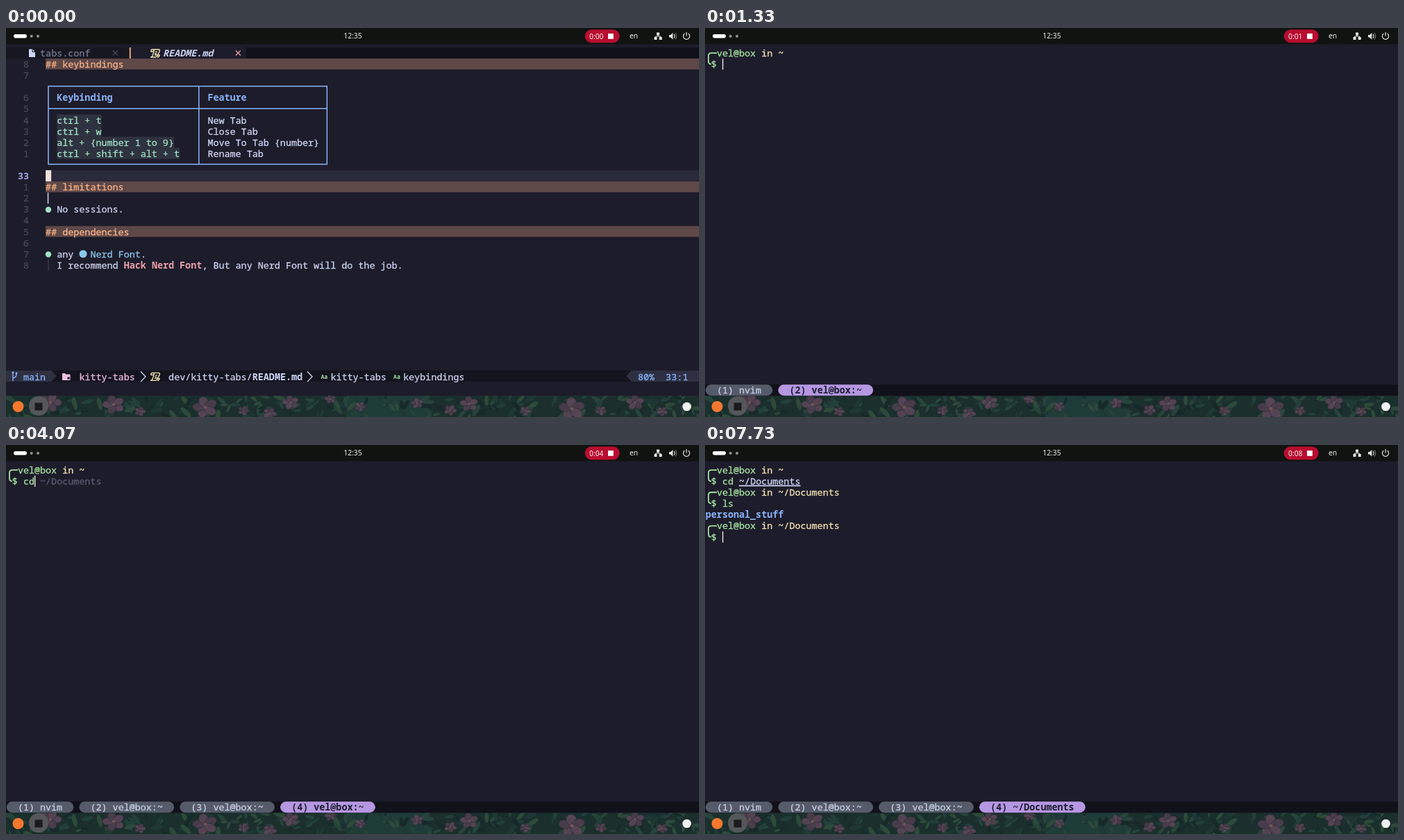
An HTML page that plays this animation: 998x561 px, repeating every 8000 ms.

```html
<!DOCTYPE html>
<html lang="en">
<head>
<meta charset="utf-8">
<title>Terminal tabs</title>
<style>
  html, body { margin: 0; width: 100%; height: 100%; overflow: hidden; background: #1d1c2a; }
  svg { display: block; width: 100vw; height: 100vh; }
  text { font: 13.4px "Noto Sans Mono", "DejaVu Sans Mono", monospace; white-space: pre; }
  .cell { stroke-width: .3px; }
  .bold { font-weight: 700; stroke-width: 0; }
  .slant { font-style: italic; }
  .line { text-decoration: underline; }
  .bar { font: 10.3px "Noto Sans", "Open Sans", sans-serif; fill: #eee; }
  .tiny { font-size: 8px; font-weight: 700; }
</style>
</head>
<body>
<svg id="stage" viewBox="0 0 998 561" xmlns="http://www.w3.org/2000/svg"></svg>
<script>
const LOOP = 8000;
const CW = 8.045, CH = 16.1, TOP = 28;
const C = {
  base: '#1d1c2a', dark: '#11111a', text: '#cdd6f4', green: '#a6e3a1', teal: '#a3e2c6',
  yellow: '#f3e3b3', blue: '#89b4fa', sky: '#89c8ea', pink: '#f0bfe2', rose: '#eba0ac',
  peach: '#fab387', dim: '#45475a', ghost: '#585b70', panel: '#2e3042', cursor: '#f0e1dc'
};
const USER = 'vel@box';

const cx = col => 0.8 + col * CW;
const cy = row => TOP + row * CH;

const rect = (x, y, w, h, fill, r = 0) =>
  `<rect x="${x}" y="${y}" width="${w}" height="${h}" rx="${r}" fill="${fill}"/>`;
const circle = (x, y, r, fill) => `<circle cx="${x}" cy="${y}" r="${r}" fill="${fill}"/>`;
const path = (d, stroke, w = 1.4, fill = 'none') =>
  `<path d="${d}" stroke="${stroke}" stroke-width="${w}" fill="${fill}"/>`;
const label = (x, y, s, attrs = '') => `<text x="${x}" y="${y}" ${attrs}>${s}</text>`;
const mono = (x, y, s, fill, cls) =>
  label(x, y, s, `fill="${fill}" stroke="${fill}" class="cell ${cls}"`);
const put = (col, row, s, fill = C.text, cls = '') => mono(cx(col), cy(row) + 12.9, s, fill, cls);
const during = (from, to, body) => `<g data-from="${from}" data-to="${to}">${body}</g>`;
const block = (col, row) => rect(cx(col), cy(row), CW, CH, C.cursor);
const beam = (col, row) => rect(cx(col), cy(row), 1.4, CH, C.cursor);

function randomFrom(seed) {
  return () => (seed = (seed * 16807) % 2147483647) / 2147483647;
}

function flower(x, y, r, turn) {
  let s = '';
  for (let i = 0; i < 5; i++) {
    const fill = i % 2 ? '#523f50' : '#5f475a';
    s += `<ellipse cx="${r * 0.52}" rx="${r * 0.5}" ry="${r * 0.38}" fill="${fill}" stroke="#33303b" stroke-width=".8" transform="rotate(${i * 72 + turn})"/>`;
  }
  return `<g transform="translate(${x} ${y}) scale(1 .85)" opacity=".85">${s}${circle(0, 0, r * 0.14, '#7b5c5c')}</g>`;
}

function wallpaper() {
  const rnd = randomFrom(77);
  const greens = ['#27443a', '#223f3a', '#2d4a3a', '#172a29', '#1f3835'];
  let s = rect(0, 530, 998, 31, '#1b2f2d') + rect(490, 530, 120, 31, '#1e3c38');
  for (let i = 0; i < 230; i++) {
    const x = rnd() * 998, y = 530 + rnd() * 31, a = rnd() * 180, l = 4 + rnd() * 6;
    s += `<ellipse cx="${x}" cy="${y}" rx="${l}" ry="${l * 0.36}" fill="${greens[i % 5]}" transform="rotate(${a} ${x} ${y})"/>`;
  }
  const spots = [[64, 540, 16], [155, 543, 16], [193, 553, 8], [287, 547, 18], [342, 552, 8], [410, 540, 12],
    [380, 556, 10], [467, 535, 8], [510, 546, 8], [592, 541, 9], [640, 551, 9], [667, 542, 13],
    [748, 552, 8], [815, 549, 19], [857, 552, 8], [906, 540, 13], [945, 553, 8]];
  spots.forEach(([x, y, r], i) => s += flower(x, y, r, i * 37));
  return `<clipPath id="dock"><rect y="530" width="998" height="31"/></clipPath><g clip-path="url(#dock)">${s}</g>`;
}

function dock() {
  return circle(17.5, 546, 8, '#f5782e') + circle(47, 545, 14, '#55575b') +
    rect(41.5, 540.5, 11, 11, '#1b1a1c') + circle(980.5, 546, 6.3, '#f2f2f2');
}

function topBar() {
  const w = '#e6e6e6';
  return rect(0, 0, 998, 23.5, '#111311') + rect(11, 9, 19, 5.4, '#fff', 2.7) +
    circle(36.7, 11.8, 2.1, '#8d8e8d') + circle(46, 11.8, 2.1, '#8d8e8d') +
    label(499.5, 15, '12:35', 'class="bar" text-anchor="middle"') +
    rect(833.7, 2.3, 50, 19, '#b90d30', 9.5) + rect(867, 8, 7.8, 7.8, '#fff') +
    label(840, 15.5, '0:00', 'id="clock" class="bar"') + label(898, 15.3, 'en', 'class="bar"') +
    rect(937, 6.5, 4, 4, w) + rect(933.5, 13, 4, 4, w) + rect(940.7, 13, 4, 4, w) +
    path('M939 10V12H935.5V14M939 12H942.7V14', w, 1) +
    path('M955 10h2.3l3-3.2v10l-3-3.2H955z', w, 0, w) + path('M962 8.8q2 3 0 6', w, 1.1) +
    path('M964 7q3.2 4.8 0 9.6', '#8a8a8a', 1) +
    path('M977.4 8a4.6 4.6 0 1 0 5.2 0M980 6v5.5', w, 1.2);
}

const scroll = (x, y) =>
  path(`M${x - 4} ${y - 5}h9q2 0 1 3l-3 6q-1 2-3 2h-7q2 0 3-2l2-6q1-3-2-3t-2 3h4M${x - 1} ${y + 3}h7q0 3-3 3M${x} ${y - 1.5}h3M${x - 1} ${y + 1}h3`, C.yellow, 1.4);
const chevron = x => path(`M${x - 4} 495.5l7 7.3l-7 7.3`, C.text, 1.3);
const cross = (x, color) => path(`M${x - 3.5} 32.5l7 7m0-7l-7 7`, color, 1.3);

function bufferLine() {
  return rect(0, TOP, 178, CH, '#171722') + rect(346, TOP, 652, CH, C.dark) +
    path('M33 30.5h5l4 4v7.5h-9z', C.text, 0, C.text) + path('M38 30.5v4h4', '#171722', 1) +
    put(6, 0, 'tabs.conf', '#777b91') + cross(157.3, C.dim) +
    rect(177.8, TOP, 1.8, CH, C.peach) + scroll(215, 36) +
    put(28, 0, 'README.md', C.text, 'bold slant') + cross(334.3, C.rose);
}

function statusLine() {
  const y = cy(29), mid = y + CH / 2;
  const aa = col => label(cx(col) - 1, y + 11, 'Aa', `class="tiny" fill="${C.green}"`);
  return rect(0, y - 1, 998, CH, '#14141f') +
    `<path d="M0 ${y - 1}H65l8 ${CH / 2}l-8 ${CH / 2}H0z" fill="${C.panel}"/>` +
    `<path d="M998 ${y - 1}H901l-8 ${CH / 2}l8 ${CH / 2}H998z" fill="${C.panel}"/>` +
    path(`M10 ${mid - 6}v12M10 ${mid + 2}q5-1 5-6`, C.blue, 1.4) + circle(10, mid - 6, 1.4, C.blue) +
    circle(15, mid - 5, 1.4, C.blue) + put(3, 29, 'main', C.blue) +
    path(`M81 ${mid - 5}h4l1.5 1.6h6v8.4h-11.5z`, C.pink, 0, C.pink) + circle(90, mid + 2, 1.8, '#14141f') +
    put(13, 29, 'kitty-tabs', C.pink) + chevron(198) + scroll(215, mid - 0.6) +
    put(29, 29, 'dev/kitty-tabs/') + put(44, 29, 'README.md', C.text, 'bold') + chevron(438) +
    aa(56.4) + put(58, 29, 'kitty-tabs') + aa(69.4) + put(71, 29, 'keybindings') +
    put(113, 29, '80%', C.blue) + put(118, 29, '33:1', C.blue);
}

function editor() {
  let s = rect(0, 23.5, 998, 506.8, C.base) + bufferLine();
  [1, 12, 16].forEach((row, i) => {
    s += rect(57, cy(row), 941, CH - 0.4, '#5e4848') +
      put(7, row, '## ' + ['keybindings', 'limitations', 'dependencies'][i], C.peach);
  });
  s += rect(57, cy(11), 941, CH - 0.4, '#292a3a') + block(7, 11) + put(2, 11, '33', '#b4befe');
  for (let row = 1; row < 20; row++) {
    const n = row < 3 ? 9 - row : row < 11 ? 10 - row : row - 11;
    if (row !== 3 && n) s += put(3, row, n, C.dim);
  }

  s += path('M61 84H462.3V196.4H61ZM61 116.2H462M277.8 84V196.4', C.blue, 1.5) +
    put(9, 4, 'Keybinding', C.blue, 'bold') + put(36, 4, 'Feature', C.blue, 'bold');
  [['ctrl + t', 'New Tab'], ['ctrl + w', 'Close Tab'],
   ['alt + {number 1 to 9}', 'Move To Tab {number}'],
   ['ctrl + shift + alt + t', 'Rename Tab']].forEach(([key, what], i) => {
    s += rect(cx(9), cy(6 + i), key.length * CW, CH, '#2e333f') +
      put(9, 6 + i, key, C.teal) + put(36, 6 + i, what);
  });

  s += rect(59.8, cy(13), 1.5, CH, C.text) + rect(60.5, cy(19), 1, CH, C.dim) +
    circle(61, 262, 4.2, C.teal) + put(9, 14, 'No sessions.') +
    circle(61, 326.5, 4.2, C.teal) + put(9, 18, 'any') + circle(111, 325.8, 5.6, C.sky) +
    put(15, 18, 'Nerd Font', C.sky) + put(24, 18, '.') +
    put(9, 19, 'I recommend') + put(21, 19, 'Hack Nerd Font', C.rose, 'bold') +
    put(35, 19, ', But any Nerd Font will do the job.');
  return s + statusLine();
}

function prompt(row, dir) {
  const y = cy(row) + CH / 2;
  return path(`M17 ${y}H9Q5 ${y} 5 ${y + 4}V${y + CH - 4}Q5 ${y + CH} 9 ${y + CH}`, C.green, 1.8) +
    put(2, row, USER, C.green) + put(10, row, 'in ' + dir, C.yellow) + put(1, row + 1, '$', C.green);
}

// The last title is the active tab.
function tabBar(titles) {
  let col = 0, s = rect(0, 514.3, 998, 16, C.dark);
  titles.forEach((title, i) => {
    const name = `(${i + 1}) ${title}`, on = i === titles.length - 1;
    s += rect(cx(col), 514.3, (name.length + 4) * CW, 15.9, on ? '#b597e2' : '#555b68', 8) +
      mono(cx(col + 2), 527.2, name, on ? '#1e1e2e' : '#c6cfe6', on ? 'bold' : '');
    col += name.length + 5;
  });
  return s;
}

function shell() {
  const home = USER + ':~', docs = '~/Documents', cmd = 'cd ' + docs;
  let s = rect(0, 23.5, 998, 506.8, C.base);

  // New tab: start, prompt ready, next tab.
  [[1070, 1200, 1670], [1670, 1800, 2200], [2200, 2330, 5670]].forEach(([open, ready, end], i) => {
    const before = ['nvim', ...Array(i).fill(home)];
    s += during(open, ready, tabBar([...before, 'zsh']) + block(0, 0)) +
      during(ready, end, tabBar([...before, home]) + prompt(0, '~'));
    s += during(ready, i < 2 ? end : 3870, beam(3, 1));
  });
  s += during(5670, LOOP, tabBar(['nvim', home, home, docs]) + prompt(0, '~') + prompt(2, docs));

  // Typed length over time, the rest is the suggestion.
  const keys = [[3870, 1], [4070, 2], [4200, 3], [4530, 4], [4730, 5], [5270, 14], [5670, 14]];
  keys.slice(0, -1).forEach(([from, n], i) => {
    s += during(from, keys[i + 1][0],
      put(3, 1, cmd.slice(0, Math.min(n, 2)), n > 1 ? C.green : C.text) +
      put(3 + n, 1, cmd.slice(n), C.ghost) + beam(3 + n, 1));
  });
  s += during(4530, 4730, put(6, 1, '~', C.text, 'line')) +
    during(4730, 5330, put(6, 1, '~/', C.text, 'line')) +
    during(5270, 5330, put(8, 1, 'Documents')) +
    during(5330, LOOP, put(6, 1, docs, C.text, 'line')) +
    during(5670, LOOP, put(3, 1, 'cd', C.green));

  s += during(5670, 6530, beam(3, 3)) +
    during(6530, 6600, put(3, 3, 'l') + beam(4, 3)) +
    during(6600, LOOP, put(3, 3, 'ls', C.green)) + during(6600, 6870, beam(5, 3)) +
    during(6870, LOOP, put(0, 4, 'personal_stuff', C.blue, 'bold') + prompt(5, docs) + beam(3, 6));
  return s;
}

const stage = document.getElementById('stage');
stage.innerHTML = wallpaper() + dock() + topBar() +
  during(0, 1070, editor()) + during(1070, LOOP, shell());

const clock = document.getElementById('clock');
const timed = [...stage.querySelectorAll('[data-from]')].map(el =>
  ({ el, from: +el.dataset.from, to: +el.dataset.to }));

function draw(now) {
  const t = now % LOOP;
  for (const { el, from, to } of timed) el.style.display = t >= from && t < to ? '' : 'none';
  clock.textContent = '0:0' + Math.floor((t + 270) / 1000);
  requestAnimationFrame(draw);
}
draw(performance.now());
</script>
</body>
</html>
```
